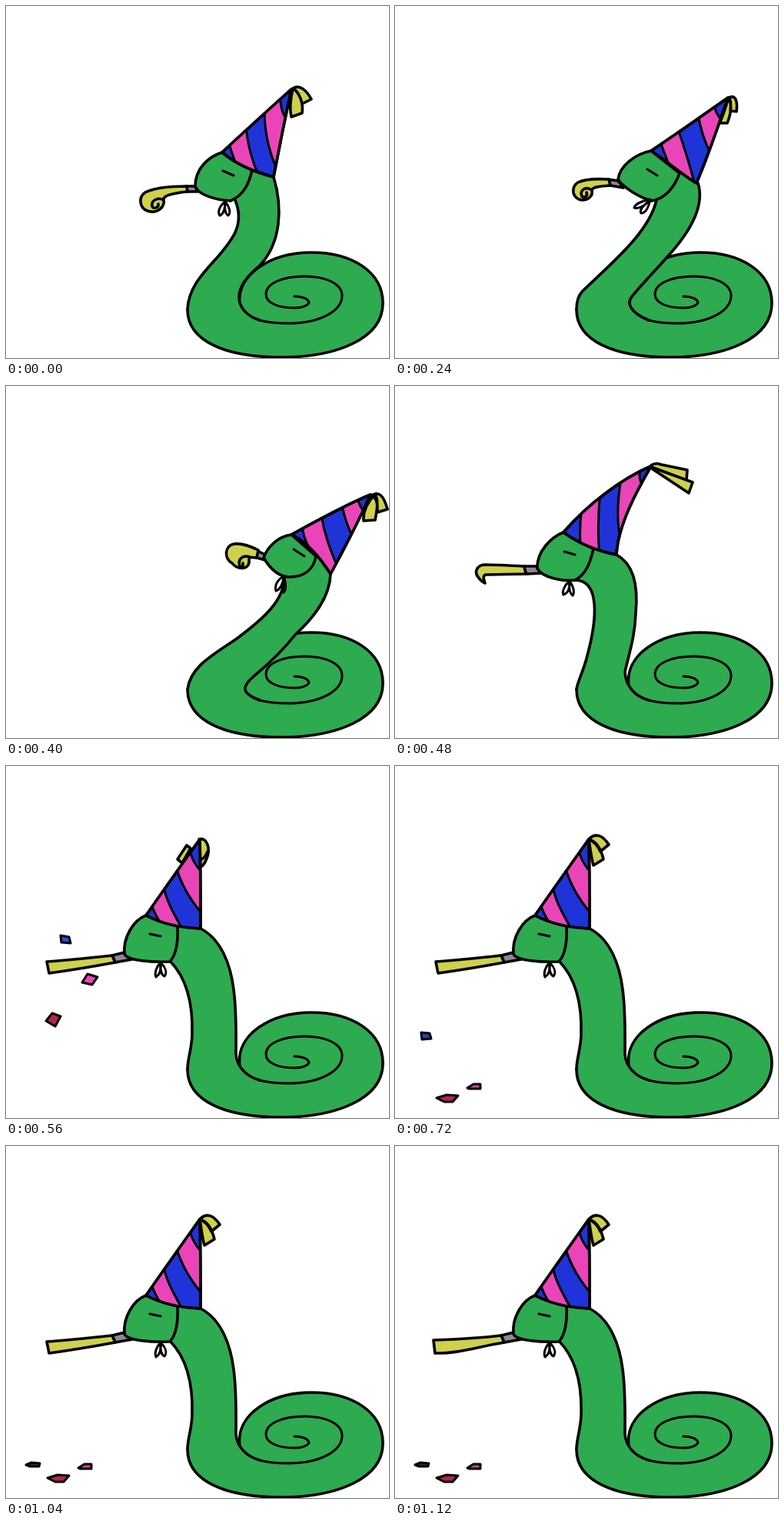
Animation, 498 px wide and 457 px high, one loop 1200 ms. Source, as an HTML page without scripts:

```html
<!DOCTYPE html>
<html lang="en">
<head>
<meta charset="utf-8">
<title>Party snake</title>
<style>
html, body { margin: 0; width: 100%; height: 100%; overflow: hidden; background: #fff; }
svg { display: block; width: 498px; height: 457px; }
path { stroke: #000; stroke-width: 3.6; stroke-linejoin: round; stroke-linecap: round; }
.green { fill: #2eaa50; }
.line { fill: none; }
.thin { stroke-width: 3; }
.move { animation: 1.2s step-end infinite; }

.neck { animation-name: neck; }
.head { animation-name: head; }
.hat { animation-name: hat; }
.felt { fill: #1f33d8; }
.bands { animation-name: bands; fill: #e945b9; }
.tassel { animation-name: tassel; fill: #cfd04b; }
.eye { animation-name: eye; }
.string { animation-name: string; }
.mouthpiece { animation-name: mouthpiece; fill: #8f8795; }
.paper { animation-name: paper; fill: #cfd04b; }
.confetti { animation-name: appear; }
.blue { animation-name: blue; }
.pink { animation-name: pink; }
.red { animation-name: red; fill: #b3264a; }

/* 0 rest, 20-33% lean back, 40% swing forward, 46% blow */
@keyframes neck {
  0% { d: path("M236 394C237 366 256 347 275 326C294 304 311 284 298 252L290 230L330 200L348 222C360 262 358 308 329 338C312 352 303 365 303 378C303 392 314 403 330 408"); }
  20% { d: path("M236 394C236 385 238 376 244 370C280 335 330 295 340 252L330 225L375 205L394 230C404 262 380 298 352 328C338 344 322 360 309 376C300 386 306 398 330 408"); animation-timing-function: steps(2); }
  33.33% { d: path("M236 394C240 364 268 350 300 328C335 302 362 278 362 248L368 225L400 200L422 244C421 275 400 301 376 323C358 346 340 362 322 377C306 391 306 399 330 408"); }
  40% { d: path("M236 394C237 384 246 368 250 350C262 306 268 252 234 252L225 225L265 195L288 219C312 232 316 264 313 295C312 325 305 345 299 371C300 390 312 403 330 408"); }
  46.66%, to { d: path("M236 394C236 380 241 370 242 350C243 320 240 280 213 253L200 228L235 190L253 211C280 225 292 258 296 290C300 320 299 350 299 374C300 390 312 403 330 408"); }
}
@keyframes head {
  0% { d: path("M281 190C262 196 246 212 246 234C250 246 275 252 292 253C310 245 316 230 320 213Z"); }
  20% { d: path("M333 188C312 192 292 208 290 225C296 235 318 249 334 253C352 250 364 234 370 217Z"); animation-timing-function: steps(2); }
  33.33% { d: path("M371 193C355 195 340 208 335 223C342 235 352 247 368 248C388 248 400 238 403 221Z"); }
  40% { d: path("M219 190C203 196 184 215 185 237C192 249 218 254 234 252C248 245 254 230 258 211Z"); }
  46.66%, to { d: path("M182 194C166 200 152 222 154 244C158 253 190 255 213 254C222 245 224 225 223 208Z"); }
}
@keyframes hat {
  0% { d: path("M281 190C300 206 325 216 348 222C354 190 363 145 371 108C341 135 311 162 281 190Z"); }
  20% { d: path("M333 188C352 200 372 218 392 230C408 193 421 153 433 119C400 142 365 167 333 188Z"); animation-timing-function: steps(2); }
  33.33% { d: path("M371 193C392 203 410 225 422 244C440 211 459 174 474 141C440 155 404 175 371 193Z"); }
  40% { d: path("M219 190C240 205 262 214 288 219C290 180 315 135 333 104C295 120 250 154 219 190Z"); }
  46.66%, to { d: path("M182 194C203 205 228 210 253 211C253 172 253 134 252 95C229 127 205 161 182 194Z"); }
}
/* bands run past the rim and are clipped to the hat */
@keyframes bands {
  0% { d: path("M289 176C293 188 296 198 301 210L329 222L329 222C320 200 314 182 312 155ZM336 134C336 165 342 190 353 213L372 156C359 143 357 132 356 115Z"); }
  20% { d: path("M344 174C349 188 353 197 358 211L391 236L391 236C383 205 376 183 367 157ZM394 140C397 160 402 175 411 193L430 154C418 142 416 136 414 124Z"); animation-timing-function: steps(2); }
  33.33% { d: path("M385 179C386 191 388 200 396 213L420 252L433 240C423 215 414 195 410 167ZM437 154C440 172 444 183 452 198L474 170C461 160 459 155 457 143Z"); }
  40% { d: path("M243 158C240 178 240 190 241 208L266 222L266 222C263 190 264 165 267 136ZM294 120C289 150 288 175 293 198L327 135C317 125 317 118 319 104Z"); }
  46.66%, to { d: path("M188 176C192 190 197 198 206 211L232 217L232 217C219 193 208 176 204 152ZM220 128C228 155 240 175 260 198L260 144C247 131 241 121 238 105Z"); }
}
@keyframes tassel {
  0% { d: path("M373 107C382 101 391 110 397 121L385 127C383 118 379 110 373 107ZM373 107C370 120 368 132 371 144L385 139C387 126 382 113 373 107Z"); }
  20% { d: path("M434 119C442 115 446 122 444 137L436 136C437 128 437 122 434 119ZM434 119C438 128 437 140 432 152L422 152C427 142 430 130 434 119Z"); animation-timing-function: steps(2); }
  33.33% { d: path("M475 142C485 136 491 142 496 160L483 164C483 154 483 146 475 142ZM480 140C469 152 464 164 465 175L480 174C482 162 485 150 480 140Z"); }
  40% { d: path("M333 103C337 100 341 100 346 102L380 109L379 122L335 106ZM333 105L387 125L382 139L335 108Z"); }
  46.66% { d: path("M235 103L240 107L229 126L223 121ZM251 95C262 92 266 108 261 120C258 128 254 131 252 131ZM253 122C257 120 260 117 262 111"); }
  53.33%, to { d: path("M252 95C261 86 270 90 278 102L267 111C264 104 259 98 252 95ZM252 95C254 108 255 118 258 129L271 121C268 108 262 98 252 95Z"); }
}
@keyframes eye {
  0% { d: path("M282 214L296 220"); }
  20% { d: path("M328 212L341 220"); animation-timing-function: steps(2); }
  33.33% { d: path("M374 212L388 221"); }
  40% { d: path("M220 215L234 219"); }
  46.66%, to { d: path("M187 218L201 221"); }
}
@keyframes string {
  0% { d: path("M285 254C277 260 275 268 278 272C283 270 285 262 285 254C284 263 285 270 289 272C293 268 290 260 285 254"); }
  20% { d: path("M332 251C322 253 312 257 311 262C318 264 326 258 332 252C324 258 317 264 320 269C327 269 330 260 332 251"); animation-timing-function: steps(2); }
  33.33% { d: path("M361 247C352 252 349 260 351 266C357 264 360 256 361 248C359 256 359 264 361 268C365 264 364 256 361 247"); }
  40% { d: path("M227 253C220 259 217 267 219 271C225 269 228 262 227 253C226 262 227 269 231 272C234 268 232 260 227 253"); }
  46.66%, to { d: path("M201 255C195 261 193 269 195 274C200 271 202 264 201 255C200 264 202 271 206 273C210 268 207 261 201 255"); }
}
@keyframes mouthpiece {
  0% { d: path("M234 234L246 234L249 241L236 241Z"); }
  20% { d: path("M277 225L290 227L297 236L280 233Z"); animation-timing-function: steps(2); }
  33.33% { d: path("M327 214L337 219L337 226L326 223Z"); }
  40% { d: path("M167 234L187 234L191 243L171 244Z"); }
  46.66%, to { d: path("M138 246L154 242L164 251L142 255Z"); }
}
@keyframes paper {
  0% { d: path("M235 234C215 234 193 236 181 242C172 248 173 262 184 266C196 270 207 262 205 251C205 247 210 244 236 241ZM205 252C198 248 188 252 190 260C192 264 199 262 198 257"); }
  20% { d: path("M278 225C262 224 246 225 238 229C230 234 229 246 239 251C249 254 258 248 256 239C257 235 265 234 280 233ZM256 239C247 233 240 240 243 247C247 250 251 246 249 242"); animation-timing-function: steps(2); }
  33.33% { d: path("M328 213C316 207 306 204 297 205C284 207 283 224 294 230C302 240 318 238 316 226C316 222 318 222 326 223ZM317 222C307 219 301 225 304 234C306 236 309 233 308 230"); }
  40% { d: path("M168 234C150 233 130 232 116 232C106 233 103 242 108 248C110 251 113 254 117 256C115 250 114 246 118 245L170 244Z"); }
  46.66%, 60%, 73.33%, 86.66% { d: path("M53 254C82 252 110 249 138 246L142 255C115 260 85 265 56 269Z"); }
  53.33%, 66.66%, 80%, 93.33%, to { d: path("M50 252C80 251 106 250 138 246L142 255C106 261 80 270 52 269Z"); }
}
@keyframes appear {
  0% { visibility: hidden; }
  46.66%, to { visibility: visible; }
}
@keyframes blue {
  0%, 46.66% { d: path("M71 220L82 222L84 230L72 229Z"); fill: #2b50d8; animation-timing-function: steps(2); }
  60% { d: path("M34 346L45 347L47 354L35 355Z"); fill: #2443b0; animation-timing-function: step-end; }
  66.66%, to { d: path("M26 414L33 411L44 412L43 416L31 416Z"); fill: #1d2c6e; }
}
@keyframes pink {
  0%, 46.66% { d: path("M106 270L119 274L112 284L99 281Z"); fill: #e945b9; animation-timing-function: steps(3); }
  66.66%, to { d: path("M94 418L102 413L111 413L111 419L97 419Z"); fill: #cf3fa5; }
}
@keyframes red {
  0%, 46.66% { d: path("M60 321L71 325L64 338L52 331Z"); animation-timing-function: steps(2); }
  60%, to { d: path("M54 431L67 427L82 428L75 436L64 436Z"); }
}
</style>
</head>
<body>
<svg viewBox="0 0 498 457">
  <clipPath id="cone"><path class="move hat"/></clipPath>
  <path class="green" d="M304 390C298 348 345 320 397 320C450 320 490 345 490 386C490 432 430 456 358 456C285 456 236 435 236 394"/>
  <path class="move neck green"/>
  <path class="line thin" d="M330 408C341 411 354 412 367 412C410 412 437 395 437 376C437 360 415 351 388 351C360 351 338 360 338 374C338 386 355 392 375 392C387 392 393 388 394 385C393 380 385 377 375 377"/>
  <path class="move mouthpiece"/>
  <path class="move paper"/>
  <path class="move head green"/>
  <path class="move string line thin"/>
  <path class="move eye line thin"/>
  <path class="move tassel"/>
  <path class="move hat felt"/>
  <g clip-path="url(#cone)"><path class="move bands thin"/></g>
  <path class="move hat line"/>
  <g class="move confetti">
    <path class="move blue thin"/>
    <path class="move pink thin"/>
    <path class="move red thin"/>
  </g>
</svg>
</body>
</html>
```
